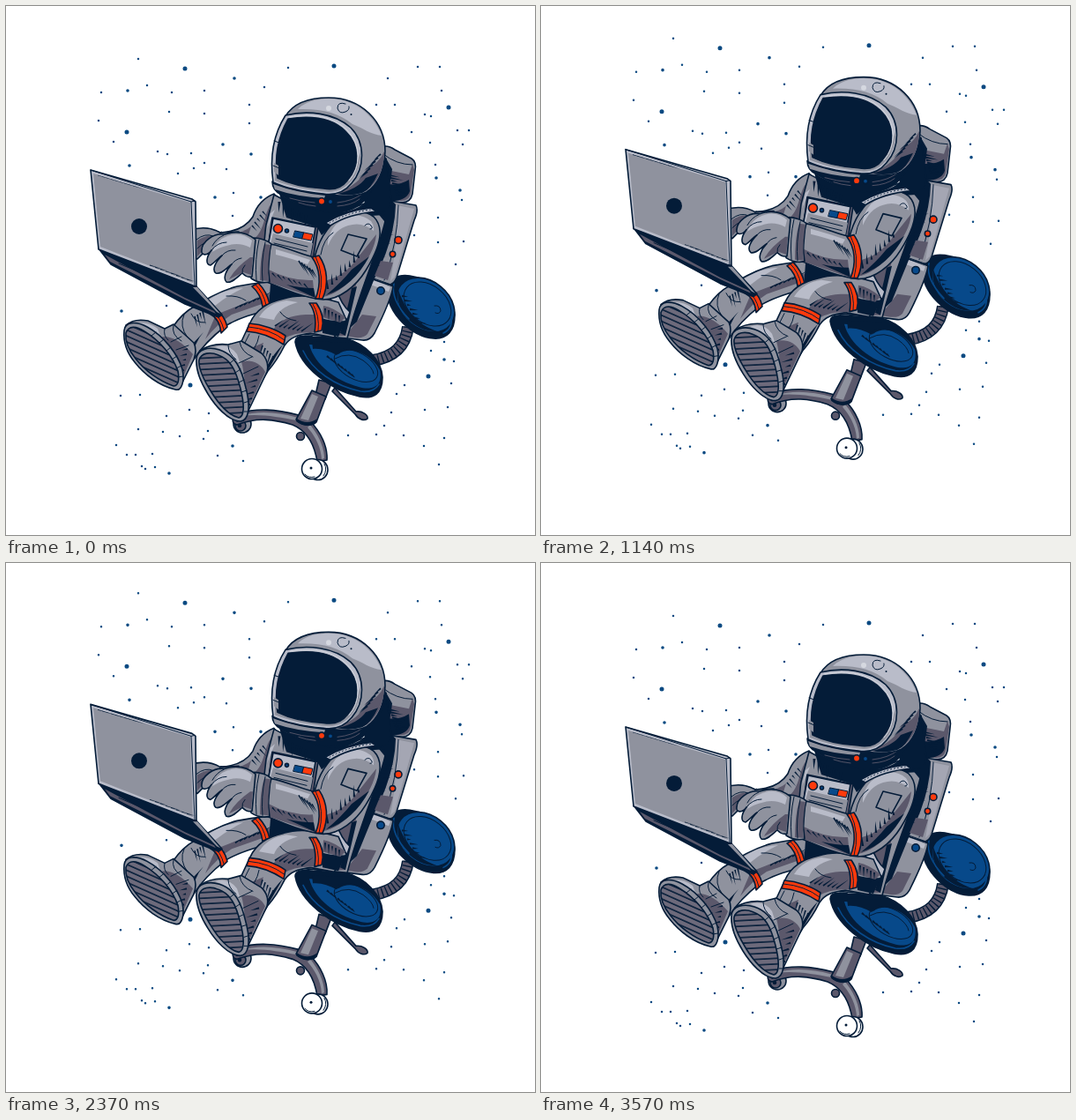
Recreate the animation shown at these times as an HTML page. Size 600x600 px, loop 3600 ms.

```html
<!DOCTYPE html>
<html lang="en">
<head>
<meta charset="utf-8">
<title>Astronaut at work</title>
<style>
html, body { margin: 0; width: 100%; height: 100%; overflow: hidden; background: #fff; }
svg { display: block; width: 100vw; height: 100vh; }
#scene { stroke: #041c38; stroke-width: 1.6; stroke-linejoin: round; stroke-linecap: round; fill: none; }
.g { fill: #8f929e; } .l { fill: #b9bcc9; } .d { fill: #5b586b; } .n { fill: #041c38; }
.b { fill: #07498a; } .r { fill: #ff3a0c; } .w { fill: #fff; }
.s { stroke: none; }
.t { stroke-width: 1; }
#scene .star { stroke: #0b4a82; }
</style>
</head>
<body>
<svg viewBox="0 0 600 600">
<defs>
  <pattern id="treadA" width="8" height="6.2" patternUnits="userSpaceOnUse" patternTransform="rotate(24)">
    <path d="M0 0h8v6.2h-8z" fill="#6d6a7b"/><path d="M0 1h8" stroke="#041c38" stroke-width="1.6"/>
  </pattern>
  <pattern id="treadB" width="8" height="6.4" patternUnits="userSpaceOnUse" patternTransform="rotate(-3)">
    <path d="M0 0h8v6.4h-8z" fill="#6d6a7b"/><path d="M0 1h8" stroke="#041c38" stroke-width="1.6"/>
  </pattern>
</defs>
<g id="scene">

<g class="star">
  <path stroke-width="5" d="M203 71h0M502 115h0M372 68h0M479 420h0M209 430h0M137 143h0"/>
  <path stroke-width="3.6" d="M259 82h0M138 96h0M246 157h0M278 168h0M140 181h0M305 168h0M289 217h0M488 195h0M131 346h0M152 409h0M497 401h0M257 499h0M515 209h0M237 217h0M185 530h0"/>
  <path stroke-width="2.500" d="M150 60h0M320 70h0M467 69h0M492 69h0M433 82h0M108 98h0M160 90h0M188 98h0M225 96h0M225 122h0M105 130h0M185 120h0M122 154h0M172 165h0M183 168h0M210 167h0M225 178h0M276 112h0M276 133h0M293 92h0M441 112h0M420 112h0M475 123h0M482 125h0M494 96h0M512 141h0M518 157h0M525 141h0M481 155h0M460 143h0M213 184h0M250 185h0M258 212h0M257 238h0M195 190h0M487 180h0M490 240h0M490 268h0M517 220h0M510 293h0M463 260h0M519 267h0"/>
  <path stroke-width="2.500" d="M182 340h0M497 381h0M482 391h0M508 403h0M505 428h0M501 455h0M475 458h0M443 440h0M437 461h0M452 430h0M429 476h0M451 487h0M497 490h0M474 499h0M491 520h0M420 486h0M388 487h0M208 458h0M182 465h0M130 442h0M152 441h0M125 498h0M150 480h0M137 509h0M154 522h0M147 509h0M158 525h0M169 523h0M166 508h0M224 491h0M230 462h0M240 510h0M269 516h0M229 482h0M178 483h0M197 488h0"/>
</g>

<g id="chair">
  <path class="d" d="M373 433L397 460C404 459 411 464 410 468C406 471 400 469 396 463L370 437Z"/>
  <circle class="d" cx="334" cy="488" r="4.500"/>
  <circle class="g" cx="268" cy="474" r="10"/><circle class="d" cx="266" cy="476" r="6"/><circle class="n" cx="265" cy="476" r="1.5"/>
  <path class="d" d="M332 464C305 457 285 456 262 462C255 466 256 474 262 475C285 466 305 469 325 475C342 482 350 498 353 517L364 515C365 500 357 483 345 471Z"/>
  <path class="g s" d="M331 467C306 460 285 459 266 465C288 462 308 466 330 470Z M345 475C354 486 361 500 361 513L358 514C357 498 349 486 342 478Z"/>
  <ellipse class="w" cx="354" cy="526" rx="11" ry="11.5"/>
  <ellipse class="w" cx="347" cy="525" rx="11.5" ry="11.5"/>
  <circle class="n s" cx="346" cy="524" r="1.5"/><path class="t" d="M339 531q4 5 11 3M361 519q4 7-1 14"/>
  <path class="d" d="M355 424L369 428L362 446L351 441Z"/>
  <path class="d" d="M347 436L363 443L352 472C345 478 334 475 329 469Z"/>
  <path class="g s" d="M347 440L354 443L343 470L334 468Z"/>
  <path class="n s" d="M330 468q12 8 23 0l-2 6q-12 5-22-3z"/>
  <path stroke-width="14" stroke-linecap="butt" d="M456 364C453 386 440 398 416 402"/>
  <path stroke="#5b586b" stroke-width="11" stroke-linecap="butt" d="M456 364C453 386 440 398 416 402"/>
  <path stroke-width="11" stroke-linecap="butt" stroke-dasharray="1.4 3.4" d="M456 364C453 386 440 398 416 402"/>
  <path class="n" d="M432 322C434 309 445 304 458 306C486 310 506 329 509 350C509 369 500 378 485 377C460 375 433 349 432 322Z"/>
  <ellipse class="b" cx="476" cy="339" rx="36" ry="27" transform="rotate(39 476 339)"/>
  <ellipse class="t" cx="478" cy="338" rx="30" ry="21" transform="rotate(39 478 338)"/>
  <path class="n s" d="M445 322C440 346 464 370 489 369C471 363 454 349 445 322Z"/>
  <path class="t" d="M486 340q7-1 7 6q-2 4-6 2"/>
  <path stroke="#07498a" d="M440 315q-4 18 17 40M496 371q11-5 9-18"/>
  <path data-hatch="449 329 3 5 7 10 1 2.4"/>
  <path class="n" d="M328 381C328 374 337 373 348 375L385 377C408 383 426 402 427 421C427 440 417 446 401 443C369 437 333 409 328 381Z"/>
  <path class="b s" d="M344 384C355 384 369 391 377 395C390 385 414 394 424 413C428 433 414 436 400 432C374 425 350 407 344 384Z"/>
  <path class="n s" d="M347 380L390 382L375 396C366 391 357 388 348 389Z"/>
  <ellipse class="t" cx="397" cy="408" rx="27" ry="15" transform="rotate(29 397 408)"/>
  <path class="t" d="M373 400q16-9 32 2q11 8 12 15"/>
  <path stroke="#07498a" d="M337 391c10 22 36 40 65 46q15 2 21-8"/>
  <path data-hatch="364 397 4 3 8 8 7 2.5"/>
</g>

<g id="pack">
  <path class="g" d="M424 160Q433 157 441 163L460 173Q466 177 464 187L461 213Q459 223 449 223L424 222Z"/>
  <path class="d s" d="M432 186L457 191L461 179L463 186L459 213Q457 221 448 221L430 220Z"/>
  <path class="n s" d="M426 164L438 185Q436 205 430 221L420 224L415 190Z M433 202q13 2 24-5l1 13q-4 12-24 11z"/>
  <path class="t" d="M428 168Q443 180 461 180"/>
  <path data-hatch="435 192 1 3 8 16 3 2.2"/>
  <path class="g" d="M411 306L439 318Q437 333 418 371Q413 380 404 379L380 376Z"/>
  <path class="l s" d="M413 309L436 319L434 324L411 315Z"/>
  <path class="d s" d="M404 350L420 352L410 372Q406 377 396 376L385 374Z"/>
  <path class="g" d="M436 221L465 226Q468 232 463 243L443 308Q440 316 434 316L410 308Q431 267 436 221Z"/>
  <path class="l s" d="M443 226L463 230L441 307L436 312Q444 270 443 226Z" opacity=".5"/>
  <path class="n s" d="M410 214L437 220L442 225Q441 265 418 309L398 358L380 375L384 335Z"/>
  <path class="t" d="M445 226Q444 270 429 311M414 308l23 8"/>
  <path class="d s" d="M425 289l14 2-6 20-15-5z"/>
  <path data-hatch="430 255 -2 5 9 13 -1 2.5"/>
  <circle class="r" cx="445" cy="265.5" r="4"/><circle class="r" cx="438.500" cy="281.500" r="3.2"/>
  <circle class="b" cx="425" cy="323" r="4.2"/>
</g>

<g id="torso">
  <path class="g" d="M304 213C291 218 284 227 280 239C273 250 262 256 243 257L240 267C260 262 272 266 284 267L300 276L320 235Z"/>
  <path class="d s" d="M301 224C292 235 294 255 281 264L298 272L307 235Z M256 258q14-1 22-8l-4 13z"/>
  <path data-hatch="279 249 3 -4 5 8 9 1.8"/>
  <path class="g" d="M304 214C330 230 375 238 412 222L430 244C425 270 400 325 387 377L335 372L297 328Q289 290 295 248Z"/>
  <path class="n s" d="M310 213Q338 231 372 234Q397 235 413 218L430 237L380 240L358 260L353 251L318 240Z"/>
  <path data-hatch="310 222 5 2.500 7 -1 17 3"/>
  <path class="l s" d="M305 231l-9 22 4-18z"/>
  <path class="d s" d="M296 306L352 326L398 312L384 374L360 374L300 336Z"/>
  <path class="n s" d="M300 316L346 331L374 333L364 340L330 330L310 334Z M392 320l6-2-13 56-6-3q8-24 13-51z"/>
  <path class="l" d="M367 321l8 1q5 16 15 25l-3 9q-17-13-21-30z"/>
</g>

<g id="panel">
  <path class="d" d="M302 240L354 251L348 289L297 276Z"/>
  <path class="l" d="M303 241L351 251L345 285L297 273Z"/>
  <path class="g s" d="M303 258L348 269L345 284L299 273Z"/>
  <circle class="r" cx="308.500" cy="252.500" r="5"/><circle class="b" cx="318.500" cy="255" r="2"/>
  <path class="b t" d="M328 255l10 2-2 7-10-2z"/><path class="r t" d="M338 257l10 2-2 7-10-2z"/>
  <path class="t" d="M306 264l36 9M304 269l37 9M302 273l31 8"/>
</g>

<g id="farLeg">
  <path class="g" d="M333 312C309 311 283 314 262 318C243 323 222 335 207 345C199 351 190 362 185 371L213 401C221 388 235 374 249 363C266 352 293 346 314 340Z"/>
  <path class="d s" d="M312 322L296 336L256 350Q240 360 226 378L238 350Q276 335 290 330Z"/>
  <path class="l s" d="M230 333q18-12 39-13-17 8-32 20z"/>
  <path class="n s" d="M300 315L331 321L315 341L298 343Z M224 370q-11 12-12 30l-7-9q10-12 19-21z"/>
  <path class="t" d="M202 350q-6 13 4 26M187 366l10 15M210 349q5 11 16 10M250 329q13-1 22 5"/>
  <path data-hatch="260 343 5 -2 7 13 -8 1.8"/>
  <path data-hatch="214 352 3 -2 4 4 17 1.8"/>
  <path class="r" d="M279 318C286 324 290 332 291 341L299 338C297 329 292 320 286 314Z"/><path class="t" d="M283 316q9 9 12 23"/>
  <path class="r" d="M231 349C239 353 243 361 244 371L251 364C249 355 245 349 238 345Z"/><path class="t" d="M235 347q9 7 12 20"/>
</g>

<g id="nearLeg">
  <path class="g" d="M377 336C362 332 337 325 315 332C296 336 283 346 277 359L262 391L281 440L297 414C305 405 311 395 316 385C322 376 331 373 345 371L372 376L386 356Z"/>
  <path class="d s" d="M340 350q-26 1-37 17l15 9q10-6 35-6l8-20z"/>
  <path class="l s" d="M287 353q10-16 31-19l13 2q-22 6-27 20z"/>
  <path class="n s" d="M358 354q12 4 27 3l-8 18-18-4z M314 384l-18 31-10 20q8-31 28-51z"/>
  <path class="d s" d="M292 382q-7 18-5 41l-8 15-9-47z M360 340q12 2 25 13l-6 6-20-6z"/>
  <path class="t" d="M276 372l-9 18M287 374q-3 16-14 22M311 347q5 8 18 10"/>
  <path data-hatch="305 363 5 1 7 14 -10 2"/>
  <path data-hatch="291 385 3 3 5 -6 20 1.8"/>
  <path data-hatch="362 343 4 2 5 0 14 2"/>
  <path class="r" d="M276 360C291 361 307 367 317 374L315 384C303 376 288 370 273 369Z"/><path class="t" d="M275 364q24 2 41 15"/>
  <path class="r" d="M344 337C351 346 352 357 350 370L358 368C361 357 359 347 352 337Z"/><path class="t" d="M348 338q8 13 6 31"/>
</g>

<g id="shoes">
  <path class="g" d="M136 362Q145 354 161 357L180 366L190 361L213 382Q217 390 213 401L196 435Q170 423 149 405Z"/>
  <path class="d s" d="M177 375q17-1 35 20l-16 37q2-34-19-57z"/>
  <path class="l s" d="M152 359q11 0 20 7l3 8q-11-10-23-15z"/>
  <path class="t" d="M180 366q-2 8 4 13M190 362q-3 11 9 18M187 381l12-6M193 390l14-5"/>
  <path data-hatch="206 389 -1 6 6 -9 2 2.2"/>
  <path class="g" d="M134 368C135 358 147 357 160 364C179 374 195 395 200 412C203 426 199 437 192 435C174 431 157 418 146 404C136 392 133 379 134 368Z"/>
  <path fill="url(#treadA)" d="M136 371C139 362 148 363 157 369C175 380 189 397 195 414C197 425 195 431 190 431C173 425 157 413 147 400C138 389 135 380 136 371Z"/>
  <path class="t" d="M170 370l-5 4M179 378l-5 4M187 387l-5 4M194 397l-6 4M199 408l-6 3M201 420l-6 1"/>
  <path class="g" d="M220 391Q233 382 252 384L267 380L290 394Q299 403 296 415L273 463L262 471Z"/>
  <path class="d s" d="M267 403q19-3 27 12l-23 49q2-37-4-61z"/>
  <path class="l s" d="M237 387q16-5 25 8l4 12q-11-15-29-20z"/>
  <path class="t" d="M252 385q0 9 9 16M265 381q2 12 15 17M264 405l15-7M269 417l17-8"/>
  <path data-hatch="287 417 -2 7 6 -14 4 2.3"/>
  <path class="g" d="M216 400C217 389 230 386 242 390C260 396 267 411 272 433C278 456 275 470 266 471C252 471 237 453 229 440C219 424 215 412 216 400Z"/>
  <path fill="url(#treadB)" d="M219 402C221 393 232 392 241 396C255 401 261 414 266 434C271 454 270 466 264 467C253 465 241 451 233 438C223 422 218 411 219 402Z"/>
  <path class="t" d="M259 401l-5 4M266 412l-6 4M270 424l-6 3M273 436l-6 2M276 448l-6 2M276 460l-6 0"/>
</g>

<g id="farHand">
  <path class="g" d="M208 255C223 249 234 252 243 257L264 256L262 265L240 270C233 270 226 278 217 287L210 285Z"/>
  <path class="d s" d="M217 266q11-7 21-5l-21 23z"/>
  <path class="t" d="M216 265q10-8 19-4M217 275q9-9 16-8M244 256q-5 6-3 13"/>
</g>

<g id="laptop">
  <path class="n" d="M105 275L215 317L245 350L241 353L203 338L119 293Z"/>
  <path class="d s" d="M112 282L118 290L205 334L238 349L236 346L203 331Z"/>
  <path class="g s" d="M212 319l5 0 26 30-4-2z"/>
  <path class="t" d="M122 284l76 31M128 292l73 31M197 314l13 17"/>
  <path class="l" d="M96 186L211 219L215 222L216 318L212 317L105 276Z"/>
  <path class="g s" d="M99 190L209 223L212 314L107 273Z"/>
  <path class="t" d="M96 186L210 222L214 317M210 222l4-1"/>
  <path data-hatch="104 192 5 1.500 9 17 5 .7"/>
  <path data-hatch="163 294 6 2.300 8 17 5 .8"/>
  <circle class="n s" cx="151" cy="250" r="9"/>
</g>

<g id="arm">
  <path class="g" d="M365 253C376 236 401 227 417 239C431 253 423 276 408 300C397 318 378 333 360 333C338 331 315 321 296 313L300 270C320 274 338 283 350 285C353 273 357 263 365 253Z"/>
  <path class="l s" d="M374 248q22-19 40-4 4 5 3 11-13-11-29-6-15 4-23 23-1-12 9-24z"/>
  <path class="d s" d="M420 259q-2 22-24 46-18 22-37 25l-1-18q25-3 42-28z M298 299q24 13 50 12l2 20-53-18z"/>
  <path class="n s" d="M412 284q-18 34-49 44 18-15 29-29z M318 316q16 4 31 4l2 11z"/>
  <path class="l s" d="M306 276q21 6 39 12l-3 5q-19-7-36-11z"/>
  <path class="g" d="M388 259L409 264L398 284L380 277Z"/>
  <path class="t" d="M407 249q4-4 7 0t-1 4M357 282q3-18 14-25"/>
  <path data-hatch="332 289 3 2 6 10 17 1.8"/>
  <path data-hatch="365 321 5 -5 8 -1 -14 2.5"/>
  <path data-hatch="302 303 6 2 7 7 8 1.8"/>
  <path class="r" d="M347 285C356 297 358 315 351 332L359 332C366 316 365 298 355 283Z"/><path class="t" d="M351 284q11 22 4 48"/>
  <path class="g" d="M281 263C288 263 297 266 301 270C296 284 297 300 299 313C291 315 284 313 278 309C276 296 282 279 281 263Z"/>
  <path class="d s" d="M293 270l7 1q-4 23-2 41l-10-1q0-27 5-41z"/>
  <path class="t" d="M287 265q-5 22-3 46M294 268q-5 24-3 44M272 278l10 2"/>
  <path class="g" d="M283 265C272 256 260 255 248 259C235 257 222 268 222 277C221 284 229 283 233 277C227 285 226 293 232 294C237 291 240 286 245 283C238 290 233 299 238 303C244 305 250 297 256 293C249 300 246 309 250 313C256 315 263 307 268 303C272 307 276 308 279 307Z"/>
  <path class="l s" d="M251 261q16-6 28 5l-2 8q-13-7-27-2-9 2-16 7 5-14 17-18z"/>
  <path class="d s" d="M277 285l3 0-2 20-9-3-16 8q7-13 24-25z"/>
  <path class="t" d="M233 277q7-9 17-9M245 283q6-7 15-6M256 293q4-6 11-7M247 260q-8 3-13 12M268 303q-1-5 3-9"/>
</g>

<g id="helmet">
  <path class="n" d="M406 212C425 202 430 187 431 173L437 220Q437 231 425 235L408 228Z"/>
  <path class="n" d="M302 199C302 207 306 211 312 214C328 224 347 231 365 234C386 236 405 229 417 206L398 203Z"/>
  <path class="g s" d="M303 202Q330 212 362 215L361 218Q328 216 305 208Z"/>
  <path stroke="#5b586b" stroke-width=".9" d="M322 218Q335 222 350 223M332 223Q340 226 351 227M376 223Q394 221 404 213M376 227Q392 226 401 219"/>
  <path class="g" d="M317 125C326 110 345 104 366 104C403 104 430 131 430 165C429 188 421 203 409 211C397 217 382 216 368 214Z"/>
  <path class="d s" d="M429 165q0 29-20 44-14 8-35 4 28-11 35-29 14-5 20-19z"/>
  <path class="n s" d="M422 190q-8 18-18 22-14 4-28 1 24-6 32-18z"/>
  <path class="l s" d="M350 107c35-7 64 9 76 40-12-1-22-9-33-13-15-13-36-18-62-17 5-5 11-8 19-10z"/>
  <path data-hatch="410 188 3 -4 6 -14 12 2"/>
  <path class="l" d="M317 124C342 118 372 121 391 138C408 155 407 184 392 201C384 211 373 215 360 213C340 211 318 207 303 200C299 172 303 146 317 124Z"/>
  <path class="g s" d="M402 166c1 25-15 45-36 45-22-2-43-6-61-13l0-11 54 19q33-4 43-40z"/>
  <path class="n" d="M320 128C346 124 369 126 385 142C402 158 401 183 387 198C381 206 371 209 360 207C341 206 322 202 308 195C304 171 309 148 320 128Z"/>
  <path stroke="#d5d8e0" stroke-width="1" d="M322 126C349 122 371 125 387 141C403 158 403 182 389 198"/>
  <path class="g s" d="M304 178l5 3 0 11-5-4z"/>
  <path class="t" d="M304 153l6 2M303 181l7 3"/>
  <path class="t" d="M385 111q-9-3-9 5 2 7 9 4 5-2 4-6"/>
  <circle class="n s" cx="391.500" cy="123" r="1"/>
  <circle cx="366" cy="116" r="3" fill="#d5d8e0" stroke="none"/>
  <circle class="r" cx="358" cy="221.500" r="3.700"/><circle class="b" cx="368" cy="222" r="2.700"/>
  <path class="l" d="M362 246Q385 232 414 229L420 233Q388 236 368 249Z"/>
  <path class="t" stroke-dasharray="1 3" d="M367 246Q388 234 414 231"/>
</g>
</g>
</svg>
<script>
const scene = document.getElementById("scene");
const LOOP = 3600, STEP = 30, RISE = 33.2;

// Tapered ink strokes: start point, spacing, count, stroke vector, thickness.
function hatch(path) {
  const [x, y, dx, dy, n, lx, ly, w] = path.dataset.hatch.split(" ").map(Number);
  const len = Math.hypot(lx, ly), nx = -ly / len * w / 2, ny = lx / len * w / 2;
  let d = "";
  for (let i = 0; i < n; i++) {
    const k = 0.72 + 0.28 * Math.sin(i * 2.4);
    d += `M${x + dx * i + nx} ${y + dy * i + ny}l${lx * k - nx} ${ly * k - ny}l${-lx * k - nx} ${-ly * k - ny}z`;
  }
  path.setAttribute("d", d);
  path.setAttribute("class", "n s");
}

function draw(now) {
  const t = Math.floor((now % LOOP) / STEP) * STEP;
  const y = -RISE / 2 * (1 - Math.cos(2 * Math.PI * t / LOOP));
  scene.setAttribute("transform", `translate(0 ${y.toFixed(2)})`);
}

document.querySelectorAll("[data-hatch]").forEach(hatch);
const start = performance.now();
function tick() {
  draw(performance.now() - start);
  requestAnimationFrame(tick);
}
draw(0);
requestAnimationFrame(tick);
</script>
</body>
</html>
```
